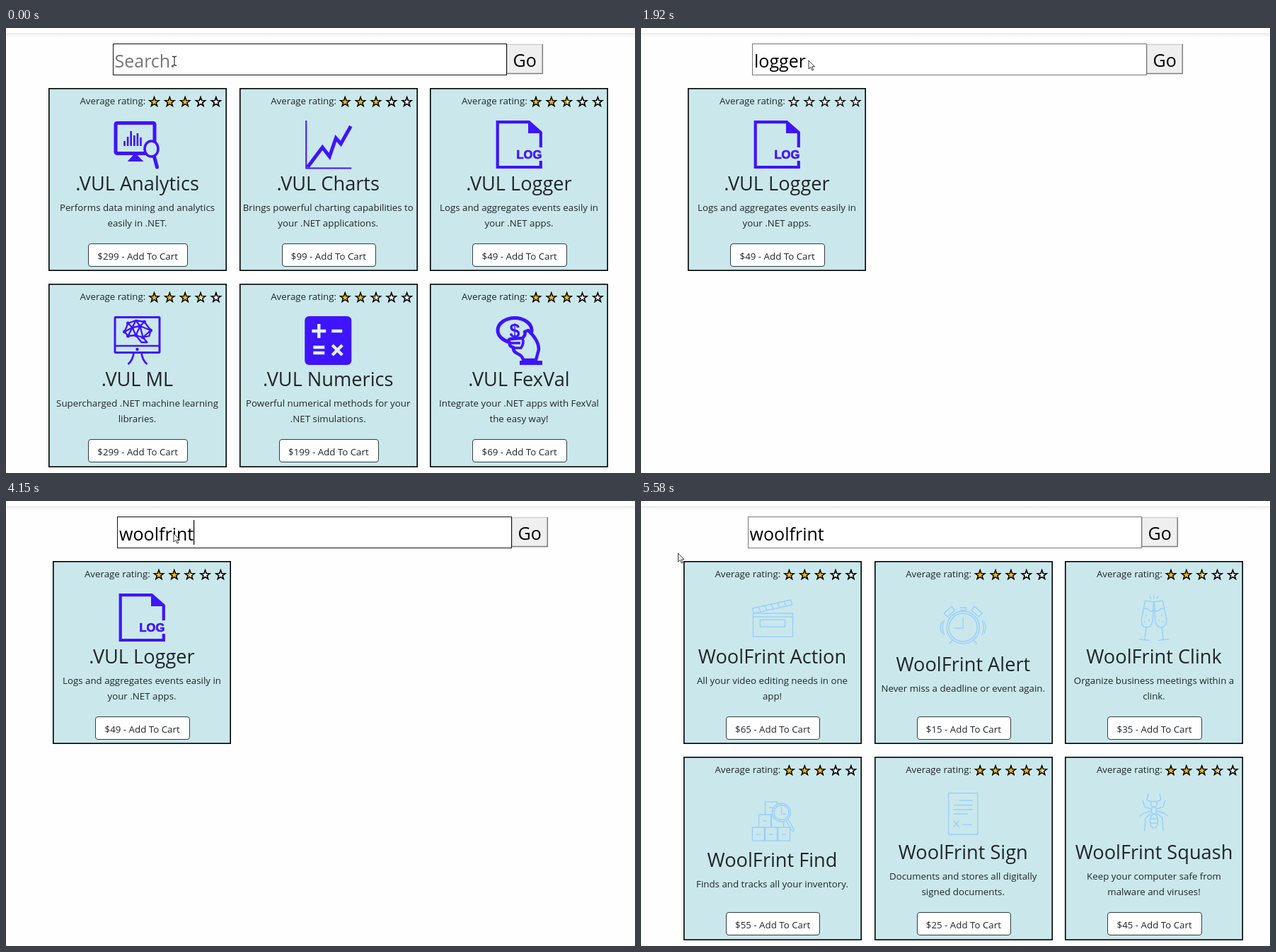
These frames come from a looping animation (889x630 px, 5.78 s). An HTML page:

```html
<!DOCTYPE html>
<html lang="en">
<head>
<meta charset="utf-8">
<title>Shop search</title>
<style>
html, body { margin: 0; width: 100%; height: 100%; overflow: hidden; background: #fefefe; }
svg { display: block; width: 889px; height: 630px; }
text { font-family: "Open Sans", "Noto Sans", sans-serif; fill: #212529; }
.mid { text-anchor: middle; }
.title { font-size: 27.2px; }
.body { font-size: 13.3px; }
.big { font-size: 25px; fill: #000; }
.item { font-size: 8.4px; fill: #000; }
.log { font: bold 16.5px "Liberation Sans", sans-serif; fill: #3f14ff; stroke: #3f14ff; stroke-width: .7; }
.coin { font: bold 27px "Liberation Sans", sans-serif; fill: #3f14ff; }
.bold { fill: none; stroke: #3f14ff; }
.thin { fill: none; stroke: #9bcffb; stroke-width: 1.5; stroke-linejoin: round; stroke-linecap: round; }
.solid { fill: #3f14ff; stroke: none; }
.paper { fill: #cae8eb; }
.star { stroke: #000; stroke-width: 1.35; }
</style>
</head>
<body>
<svg viewBox="0 0 889 630">
  <defs>
    <linearGradient id="fade" x2="0" y2="1">
      <stop stop-color="#ebebeb"/><stop offset="1" stop-color="#fefefe"/>
    </linearGradient>
    <linearGradient id="part50"><stop offset=".5" stop-color="#fb0"/><stop offset=".5" stop-color="#fff"/></linearGradient>
    <linearGradient id="part75"><stop offset=".68" stop-color="#fb0"/><stop offset=".68" stop-color="#fff"/></linearGradient>
  </defs>
  <rect width="889" height="7" fill="#fff"/>
  <rect y="7" width="889" height="6" fill="url(#fade)"/>
  <g id="go">
    <rect x=".5" y="23.5" width="50" height="41" fill="#efefef" stroke="#c6c6c6"/>
    <path d="M50.3 23V65M0 64.5H51" fill="none" stroke="#7c7c7c" stroke-width="1.5"/>
    <text class="big" x="8.6" y="55">Go</text>
  </g>
  <rect id="box" y="22.5" height="44" fill="#fff"/>
  <rect id="mark" y="28" height="34" fill="#0078d7"/>
  <text id="field" class="big" y="56"></text>
  <rect id="caret" y="27" width="1.2" height="35"/>
  <g id="pages"></g>
  <g id="popup">
    <rect id="shade" x="2" y="69" width="558" fill="#959595"/>
    <rect id="list" x=".5" y="67.5" width="557" fill="#fff" stroke="#bbb"/>
    <text id="item0" class="item" x="4.3" y="78.5"></text>
    <text id="item1" class="item" x="4.3" y="95.5"></text>
  </g>
  <path id="beam" d="M-3.2-6.5Q0-6.5 0-4.8Q0-6.5 3.2-6.5M0-5V5M-3.2 6.5Q0 6.5 0 4.8Q0 6.5 3.2 6.5" fill="none" stroke="#333" stroke-width="1.2" transform="translate(238 46.7)"/>
  <path id="arrow" d="M0 0V12L2.8 9.4L4.9 14L6.7 13.2L4.7 8.8H8.5Z" fill="#fff" stroke="#222" stroke-width=".9"/>
</svg>
<script>
const LOOP = 5780;
const QUERY = "logger", BRAND = "woolfrint", LABEL = "WoolFrint";
const $ = id => document.getElementById(id);
const set = (el, attrs) => { for (const k in attrs) el.setAttribute(k, attrs[k]); };
const show = (el, on) => { el.style.display = on ? "" : "none"; };
const within = (t, ...spans) => spans.some(([a, b]) => t >= a && t < b);
const last = (list, t) => list.filter(e => e[0] <= t).pop();

// Icons: x from the card's middle, y from its top edge.
const path = (d, w, extra = "") => `<path d="${d}"${w ? ` stroke-width="${w}"` : ""} ${extra}/>`;
const bold = s => `<g class="bold">${s}</g>`;
const thin = s => `<g class="thin">${s}</g>`;
const mirror = s => s + `<g transform="scale(-1 1)">${s}</g>`;

const glass = `<g transform="translate(-6.5 57) rotate(7)">${path("M-6 0H6L8 25Q8 37 0 37Q-8 37-8 25ZM-7 12Q-3 9 0 12T7 12M0 37V54M-7 55H7M-2 20v1M3 26v1M-3 29v1")}</g>`;
const icons = {
  analytics: bold(
    `<rect x="-30.5" y="49.5" width="55" height="43" rx="2" stroke-width="5"/>` +
    path("M-18 82v-7M-13.4 82v-13M-8.8 82v-21M-4.2 82v-15M.4 82v-18M5 82v-12", 2.6) +
    path("M-3 92L9 104H-14Z", 0, 'class="solid"') +
    `<ellipse class="paper" cx="20" cy="86" rx="9.5" ry="11" stroke-width="3.5"/>` +
    path("M24 97L28 112", 5, 'stroke-linecap="round"')),
  charts: bold(path("M-31 46V113.5H33", 2) + path("M-29 112L-8 84L2 97L11 71L18 79L32 54", 5)),
  logger: bold(
    path("M30.8 84V63L14 48.2H-30.3V112H30.8V103", 4.2) +
    path("M13 46L33 64H13Z", 0, 'class="solid"')) +
    `<text class="log" x="-3.5" y="100">LOG</text>`,
  ml: bold(
    `<rect x="-31.5" y="47.5" width="63" height="50" rx="1" stroke-width="3"/>` +
    path("M-31 88H31M-5 98Q-6 108-13 114M6 98Q7 108 14 114", 2.6) +
    `<circle class="solid" cx="0" cy="93" r="2.2"/>` +
    path("M-18 68L-13 56L-2 52L10 54L19 66L17 74L8 76L14 83L6 83L-2 73L-13 74ZM-18 68L-7 62L-13 56M-7 62L-2 52L4 60L10 54M4 60L-7 62L-2 73L4 60L19 66L8 76L4 60M-13 74L-7 62M-2 73L8 76L17 74", 2.3, 'stroke-linejoin="round"') +
    path("M-18 68h0M-13 56h0M-7 62h0M4 60h0M-2 73h0M8 76h0M10 54h0M19 66h0M-13 74h0", 5, 'stroke-linecap="round"')),
  numerics: `<rect class="solid" x="-33" y="46" width="66" height="69" rx="6"/>` +
    path("M-23 67H-3M-13 57V77M5 67H20M-21 90H-5M-21 98H-5M6 87L20 101M20 87L6 101", 4.4, 'stroke="#dff3f5"'),
  coin: bold(
    `<ellipse cx="-6" cy="66" rx="24" ry="17.5" stroke-width="5"/>` +
    path("M13 66Q28 80 28 93L24 108H6Q5 102-2 99Q-9 96-8 90Q-14 89-13 84Q-17 78-10 78L5 77Q10 72 8 68Z", 4.5, 'class="paper" stroke-linejoin="round"') +
    path("M-12 84H2M-8 91H3M5 77Q8 85 2 92", 3.5) +
    path("M1 112H33", 6)) + `<text class="coin mid" x="-6" y="76">$</text>`,
  action: thin(
    path("M-27 74H29V107H-27ZM-17 83H18V93H-17ZM-27 79H29") +
    path("M-28 67L26 55L28 62L-26 74ZM-20 65L-16 72M-11 63L-7 70M-2 61L2 68M7 59L11 66M16 57L20 64")),
  alert: thin(
    `<circle cx="0" cy="94" r="20"/><circle cx="0" cy="94" r="23"/>` +
    path("M0 81V95H-11M-4 66H4V70H-4M0 70V71") +
    mirror(path("M-22 79L-27 74L-16 64L-12 70ZM-15 112L-19 117M-27 84Q-31 94-27 104M-30 86Q-34 94-30 102"))),
  clink: thin(mirror(glass) + path("M0 49V53M-6 50L-4 53M6 50L4 53")),
  find: thin(
    path("M-28 100H-11V119H-28ZM-10 100H7V119H-10ZM8 100H25V119H8ZM-19 82H-2V100H-19ZM-1 82H16V100H-1ZM-10 64H7V82H-10Z") +
    path("M-22 110h5M-4 110h5M14 110h5M-13 91h5M-4 72h5") +
    `<circle class="paper" cx="13" cy="79" r="13"/><circle cx="13" cy="79" r="10.5"/>` +
    path("M13 72V81H19M20 91L28 105Q32 107 30 102L23 89")),
  sign: thin(path("M-20.5 51.5H20.5V110H-20.5ZM-5 62H13M-13 68.5H13M-13 75H13M-13 81H6M-13 91l7 8M-6 91l-7 8M0 96H12")),
  squash: thin(
    `<ellipse cx="0" cy="67" rx="4.5" ry="4"/><ellipse cx="0" cy="76" rx="3.5" ry="5"/><ellipse cx="0" cy="91" rx="5.5" ry="10"/>` +
    path("M-5 88H5M-5 94H5") +
    mirror(path("M-3 64L-10 61L-8 53M-4 74L-13 71L-16 62M-4 77L-14 80L-20 84M-4 80L-12 87L-13 105")))
};

const dotVul = [
  [".VUL Analytics", ["Performs data mining and analytics", "easily in .NET."], 299, 2.75, "analytics"],
  [".VUL Charts", ["Brings powerful charting capabilities to", "your .NET applications."], 99, 3, "charts"],
  [".VUL Logger", ["Logs and aggregates events easily in", "your .NET apps."], 49, 2.5, "logger"],
  [".VUL ML", ["Supercharged .NET machine learning", "libraries."], 299, 3.5, "ml"],
  [".VUL Numerics", ["Powerful numerical methods for your", ".NET simulations."], 199, 2.5, "numerics"],
  [".VUL FexVal", ["Integrate your .NET apps with FexVal", "the easy way!"], 69, 3, "coin"]
];
const suite = [
  ["Action", ["All your video editing needs in one", "app!"], 65, 2.75, "action"],
  ["Alert", ["Never miss a deadline or event again."], 15, 3, "alert"],
  ["Clink", ["Organize business meetings within a", "clink."], 35, 2.5, "clink"],
  ["Find", ["Finds and tracks all your inventory."], 55, 3, "find"],
  ["Sign", ["Documents and stores all digitally", "signed documents."], 25, 4.5, "sign"],
  ["Squash", ["Keep your computer safe from", "malware and viruses!"], 45, 3.5, "squash"]
].map(([name, ...rest]) => [`${LABEL} ${name}`, ...rest]);

const starPoints = Array.from({ length: 10 }, (_, i) => {
  const r = i % 2 ? 2.75 : 6.9, a = i * Math.PI / 5;
  return `${(r * Math.sin(a)).toFixed(2)},${(-r * Math.cos(a)).toFixed(2)}`;
}).join(" ");

const star = (x, y, fill) =>
  `<polygon class="star" points="${starPoints}" transform="translate(${x} ${y})" fill="${fill}"/>`;

function stars(x, y, rating) {
  const paint = part => part >= 1 ? "#fb0" : part > .6 ? "url(#part75)" : part > 0 ? "url(#part50)" : "none";
  const row = f => [0, 1, 2, 3, 4].map(i => star(x + 21.85 * i, y, f(i))).join("");
  return row(() => "#fff") + `<g class="rated" style="stroke:none">${row(i => paint(rating - i))}</g>`;
}

function card([title, lines, price, rating, icon], i, dx) {
  const left = 59.75 + 269.75 * (i % 3) + dx, top = 84.6 + 277.4 * (i > 2);
  const x = Math.round(left), y = Math.round(top), cx = left + 125.75;
  const w = Math.round(left + 252) - x, h = Math.round(top + 259.6) - y;
  const drop = lines.length < 2 ? 10.5 : 0;
  const bw = price > 99 ? 140.9 : 133.4, bLeft = cx + .95 - bw / 2;
  const bx = Math.round(bLeft), bEnd = Math.round(bLeft + bw);
  const text = (cls, ty, s, tx = cx) => `<text class="mid ${cls}" x="${tx}" y="${y + ty}">${s}</text>`;
  return `<rect x="${x + .8}" y="${y + .8}" width="${w - 1.6}" height="${h - 1.6}" fill="#cae8eb" stroke="#000" stroke-width="1.6"/>
    <text class="body" text-anchor="end" x="${left + 137.6}" y="${y + 23}">Average rating:</text>
    ${stars(left + 149.75, y + 19.8, rating)}
    <g transform="translate(${cx} ${y})">${icons[icon]}</g>
    ${text("title", 145 + drop, title)}
    ${lines.map((s, n) => text("body", 174 + drop + 21.6 * n, s)).join("")}
    <rect x="${bx + .5}" y="${y + 220.5}" width="${bEnd - bx - 1}" height="32" rx="3.5" fill="#fff" stroke="#343a40"/>
    ${text("body", 243, `$${price} - Add To Cart`, cx + .6)}`;
}

const page = (items, dx) => `<g>${items.map((it, i) => card(it, i, dx)).join("")}</g>`;
$("pages").innerHTML = page(dotVul, 0) + page([dotVul[2]], 6.5) + page(suite, 0);
const pages = [...$("pages").children];
const rated = pages.map(p => [...p.querySelectorAll(".rated")]);

// [time, text]
const typing = (word, times) => times.map((t, i) => [t, word.slice(0, i + 1)]);
const texts = [[0, ""],
  ...typing(QUERY, [760, 860, 970, 1080, 1180, 1280]),
  ...typing(BRAND, [2810, 3000, 3250, 3340, 3430, 3510, 3660, 3720, 3790])];

// [time, suggestions]
const hints = [[0, []], [760, [QUERY, "lists"]], [860, [QUERY]], [1410, []],
  [2400, [QUERY]], [2810, [BRAND]], [3790, []]];

// [time, share of the way to the left margin]
const moves = [[0, 0], [5440, .25], [5490, .55], [5540, .85], [5580, 1]];

function draw(t) {
  const now = t < 1920 ? 0 : t < 4260 ? 1 : 2;
  const dx = now === 1 ? 6.5 : 0;
  const left = Math.round(150.75 + dx), right = Math.round(708.25 + dx);
  pages.forEach((p, i) => show(p, i === now));
  show(rated[1][0], t >= 2060);
  rated[2].forEach((g, i) => show(g, t >= 4310 + 72.5 * Math.max(0, i - 1)));

  const focused = within(t, [0, 1920], [2060, 4260], [4380, 5580]);
  set($("box"), { x: left + .5, width: right - left - 1, stroke: focused ? "#111" : "#767676" });
  set($("go"), { transform: `translate(${right} 0)` });

  const field = $("field"), text = last(texts, t)[1], start = 153.5 + dx;
  const picked = within(t, [2400, 2810]);
  field.textContent = text || "Search.";
  field.style.fill = picked ? "#fff" : text ? "#000" : "#757575";
  set(field, { x: start });
  const width = text ? field.getComputedTextLength() : 0;
  show($("mark"), picked);
  set($("mark"), { x: start, width });
  show($("caret"), within(t, [160, 1810], [2810, 4260]));
  set($("caret"), { x: Math.round(start + width), opacity: t < 280 ? (t < 220 ? .35 : .7) : 1 });

  const list = last(hints, t)[1], tall = 17 * list.length;
  show($("popup"), tall);
  if (tall) {
    set($("popup"), { transform: `translate(${left} 0)` });
    set($("shade"), { height: tall - 1 });
    set($("list"), { height: tall - 2 });
    $("item0").textContent = list[0];
    $("item1").textContent = list[1] || "";
  }

  const arrow = within(t, [1810, 2400], [4150, LOOP]), k = last(moves, t)[1];
  show($("beam"), !arrow);
  show($("arrow"), arrow);
  set($("arrow"), { transform: `translate(${237 - 184.5 * k} ${46 + 28 * k})` });
}

function tick() {
  draw(performance.now() % LOOP);
  requestAnimationFrame(tick);
}
tick();
</script>
</body>
</html>
```
